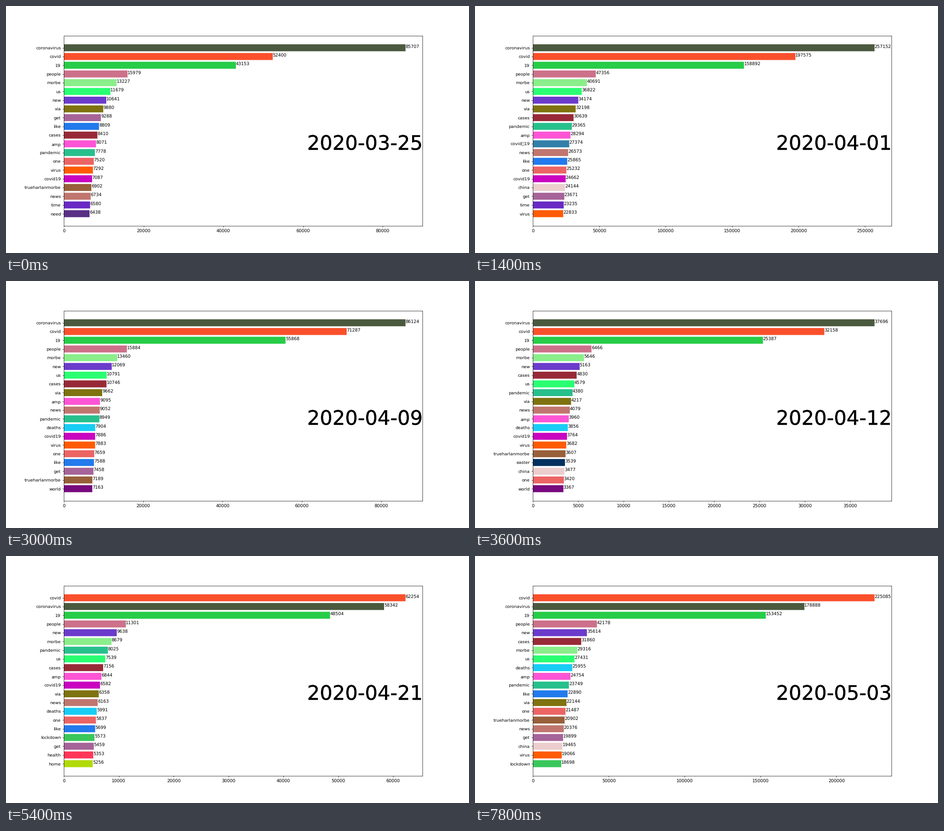
Write a matplotlib script that moves like this. It is 1025 px wide and 547 px high and loops after 8000 ms.

```python
import numpy as np
import matplotlib.pyplot as plt
from matplotlib.animation import FuncAnimation
from matplotlib.patheffects import withStroke

plt.rcParams.update({"font.family": "DejaVu Sans", "font.size": 10,
                     "xtick.labelsize": 10.2, "text.hinting": "none"})

DAYS = 40
BARS = 20
START = np.datetime64("2020-03-25")

COLORS = {
    "coronavirus": "#4b5a3f", "covid": "#fa502c", "19": "#27cc48",
    "people": "#cc7189", "morbe": "#8aee8a", "us": "#2aff72",
    "new": "#6b3bcb", "via": "#7f7210", "get": "#a66499",
    "like": "#227aec", "cases": "#982a38", "amp": "#fd55d5",
    "pandemic": "#27c08c", "one": "#ec6464", "virus": "#ff5b05",
    "covid19": "#c905c0", "trueharlanmorbe": "#98603a", "news": "#c0766f",
    "time": "#6929c4", "need": "#592f86", "covid\u30fc19": "#317fa9",
    "china": "#ebcecd", "deaths": "#18cdf5", "world": "#770a7d",
    "easter": "#04305f", "lockdown": "#39c75b", "health": "#ff3658",
    "home": "#b1da09",
}


def ranking(leaders, fourth, last, words):
    """Three leading counts, then a power-law tail from fourth to last."""
    k = np.arange(BARS - len(leaders)) + 1.5
    falloff = np.log(fourth / last) / np.log(k[-1] / k[0])
    tail = fourth * (k / k[0]) ** -falloff
    return dict(zip(words.split(), [*leaders, *tail]))


KEY_DAYS = {
    0: ranking((85707, 52400, 43153), 15979, 6438,
               "coronavirus covid 19 people morbe us new via get like cases "
               "amp pandemic one virus covid19 trueharlanmorbe news time "
               "need"),
    7: ranking((257152, 197575, 158892), 47356, 22833,
               "coronavirus covid 19 people morbe us new via cases pandemic "
               "amp covid\u30fc19 news like one covid19 china get time virus"),
    11: ranking((259159, 206052, 159919), 52647, 19597,
                "coronavirus covid 19 people morbe new us cases via amp news "
                "like get pandemic one virus covid19 deaths time world"),
    18: ranking((37696, 32158, 25387), 6466, 3367,
                "coronavirus covid 19 people morbe new cases us pandemic via "
                "news amp deaths covid19 virus trueharlanmorbe easter china "
                "one world"),
    27: ranking((62254, 58342, 48504), 11301, 5256,
                "covid coronavirus 19 people new morbe pandemic us cases amp "
                "covid19 via news deaths one like lockdown get health home"),
    32: ranking((232922, 195472, 167144), 44481, 18078,
                "covid coronavirus 19 people new morbe cases via amp us "
                "pandemic news deaths lockdown one like trueharlanmorbe get "
                "covid19 time"),
    39: ranking((225085, 178888, 153452), 42178, 18698,
                "covid coronavirus 19 people new cases morbe us deaths amp "
                "pandemic like via one trueharlanmorbe news get china virus "
                "lockdown"),
}


def count(word, day):
    """Geometric interpolation; unranked words sit just below the last bar."""
    known = [t.get(word, 0.92 * min(t.values())) for t in KEY_DAYS.values()]
    return round(float(np.exp(np.interp(day, list(KEY_DAYS), np.log(known)))))


def top_words(day):
    counts = {word: count(word, day) for word in COLORS}
    ranked = sorted(counts.items(), key=lambda item: -item[1])
    return ranked[:BARS][::-1]


fig, ax = plt.subplots(figsize=(15, 8.005), dpi=68.3334)
fig.subplots_adjust(right=0.8999)


def draw(day):
    ax.clear()
    words, counts = zip(*top_words(day))
    ax.barh(words, counts, color=[COLORS[w] for w in words], snap=False)
    ax.set_xlim(0, 1.0501 * counts[-1])
    for row, value in enumerate(counts):
        ax.text(value, row, str(value), size=10.2)
    ax.text(1, 0.4, str(START + day), transform=ax.transAxes, size=46.4,
            ha="right",
            path_effects=[withStroke(linewidth=0.35, foreground="black")])


anim = FuncAnimation(fig, draw, frames=DAYS, interval=200, repeat=True,
                     repeat_delay=0)
plt.show()
```
